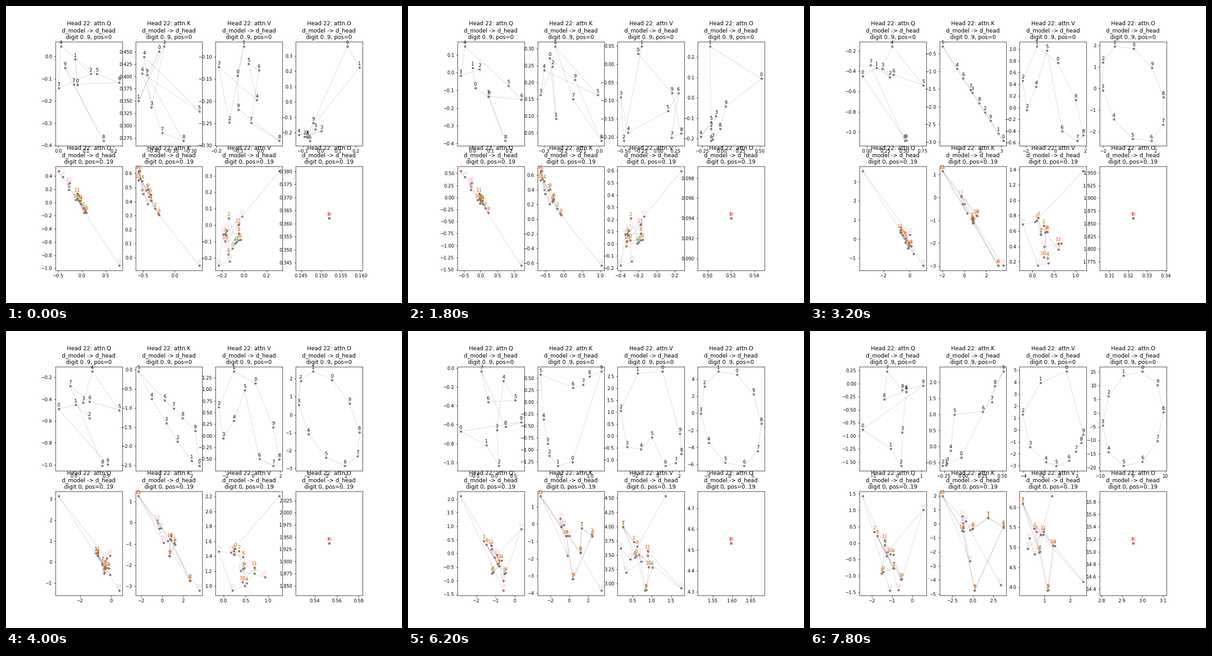
A matplotlib script that plays this animation: 864 px wide and 648 px high, repeating every 8 s.

```python
import numpy as np
import matplotlib.pyplot as plt
from matplotlib.animation import FuncAnimation

FRAMES, STEP = 40, 200
EARLY, MID, LATE = 9, 16, 39    # steps of the key poses after step 0

fig, axes = plt.subplots(2, 4, figsize=(12, 9), dpi=72)
panels = []


class Panel:
    """A labelled path moving between poses {step: (x, y)}."""

    def __init__(self, row, col, poses=None):
        self.ax = axes[row, col]
        self.closed = row == 0
        self.poses = poses
        count, what = ((19, "digit 0, pos=0..19") if row
                       else (10, "digit 0..9, pos=0"))
        self.ax.set_title(f"Head 22: attn.{'QKVO'[col]}\n"
                          f"d_model -> d_head\n{what}")
        self.line, = self.ax.plot([], [], "-o", color="gray", lw=0.3,
                                  ms=4, mew=1)
        self.labels = [
            self.ax.annotate(str(i), (0, 0), xytext=(0, 5), ha="center",
                             textcoords="offset points",
                             color=self.color(i, row))
            for i in range(count)]
        panels.append(self)

    @staticmethod
    def color(i, row):
        if row == 0:
            return "black"
        return "olive" if i < 6 else "orangered" if i < 12 else "pink"

    def points(self, step):
        steps = sorted(self.poses)
        k = min(np.searchsorted(steps, step, "right"), len(steps) - 1)
        a, b = steps[k - 1], steps[k]
        t = (step - a) / (b - a)
        return [blend(np.asarray(p), np.asarray(q), t)
                for p, q in zip(self.poses[a], self.poses[b])]

    def show(self, x, y):
        for label, x0, y0 in zip(self.labels, x, y):
            label.xy = x0, y0
        if self.closed:
            x, y = np.append(x, x[0]), np.append(y, y[0])
        self.line.set_data(x, y)
        self.ax.relim()
        self.ax.autoscale_view()


def blend(p, q, t):
    """Shape and centre move linearly, the extent grows geometrically."""
    def split(v):
        span, mid = np.ptp(v), (v.min() + v.max()) / 2
        return (v - mid) / span, mid, span
    (u, m, s), (v, n, r) = split(p), split(q)
    return m + (n - m) * t + s * (r / s) ** t * (u + (v - u) * t)


def ring(cx, rx, ax, cy, ry, ay):
    turn = np.arange(10) * 36
    return (cx + rx * np.cos(np.radians(turn + ax)),
            cy + ry * np.sin(np.radians(turn + ay)))


def chain(panel, step, x, y, spread, box=None):
    """Positions 0..18: 0 is shared with the panel above, 6..11 repeat 0..5.

    x and y hold positions 1..5 and 12..18, in box units if there is a box.
    """
    rng = np.random.default_rng(4)
    out = []
    for axis, v in enumerate((x, y)):
        v = np.array(v, float)
        if box:
            lo, hi = box[2 * axis:2 * axis + 2]
            v = lo + v * (hi - lo)
        first = np.r_[panel.poses[step][axis][0], v[:5]]
        twin = first + rng.normal(0, spread, 6) * np.ptp(v)
        twin = np.clip(twin, v.min(), v.max())
        out.append(np.r_[first, twin, v[5:]])
    return out


top_q = Panel(0, 0, {
    0: ([.069, .061, .117, .001, .01, .139, .22, .056, .163, .024],
        [-.127, -.012, -.079, -.143, .045, -.079, -.118, -.125, -.379, -.052]),
    EARLY: ([.016, .001, .039, -.065, -.041, .197, .267, .086, .18, .09],
            [-.087, .027, .019, -.018, .149, -.074, -.153, -.133, -.386,
             -.135]),
    MID: ([-.06, .13, .31, .21, .34, .76, .36, .05, .51, .53],
          [-.448, -.367, -.461, -.378, -.157, -.538, -.436, -.342, -1.087,
           -1.08]),
    LATE: ([-1.45, -.28, .16, .2, .37, .37, -.55, -.42, .21, 1.08],
           [-.88, -1.25, -1.576, -.93, -.16, -.15, -.3, .232, -.13, -.04])})

slope = np.array([3.09, 2.87, 2.22, 1.63, .9, .22, 1.2, 1.54, 1.95, 2.48])
top_k = Panel(0, 1, {
    0: ([-.385, -.441, -.371, -.406, -.426, -.276, -.431, -.377, -.319, -.418],
        [.451, .35, .461, .337, .44, .329, .406, .285, .269, .403]),
    EARLY: ([-.27, -.236, -.255, -.32, -.302, -.01, -.24, -.143, .01, -.133],
            [.272, .092, .247, .162, .236, .162, .307, .15, .026, .208]),
    MID: (slope, -.09 - .93 * slope),
    LATE: ([-.03, -.226, -.27, -.21, -.167, -.116, .253, .366, .405, .515],
           [-.34, -.59, -.605, -.535, -.13, 1, 1.09, 1.38, 1.88, 2.34])})

top_v = Panel(0, 2, {
    0: ([-.104, -.076, -.142, -.19, -.017, -.054, -.008, -.043, .085, -.101],
        [-.142, -.076, -.248, -.123, -.197, -.115, -.13, -.249, -.29, -.219]),
    EARLY: ([-.294, -.241, -.503, -.547, -.437, .138, .29, .194, .334, .198],
            [.029, .049, -.211, -.091, -.188, -.129, -.079, -.202, -.19,
             -.079]),
    MID: ([.14, -1.26, -2.22, -1.94, -1.31, -.58, .42, 1.45, 1.86, 1.35],
          [.77, 1.05, .46, -.04, .36, .98, -.4, -.57, -.47, .13]),
    LATE: ([.82, -2.1, -4.1, -3.28, -1.5, -.33, 1.08, 1.87, 2.46, 2.69],
           [4.9, 3.95, 1.3, -1.42, -2.68, -3, -2.57, -1.8, -1.07, -.38])})

top_o = Panel(0, 3, {
    0: ([.152, .22, -.091, .006, -.123, -.028, -.061, -.078, -.073, -.041],
        [.362, .225, -.225, -.192, -.214, -.178, -.254, -.225, -.232, -.136]),
    EARLY: ([.52, -.15, -.134, -.07, -.27, -.134, -.134, -.11, -.02, .057],
            [.094, .252, -.151, -.09, -.191, -.118, -.211, -.203, -.152,
             -.043]),
    MID: ring(.28, 2.44, 89, -.235, 2.26, 68),
    24: ring(.22, 4.24, 80, -.2, 3.22, 42),
    31: ring(.3, 6.8, 79, -.63, 5.65, 66),
    LATE: ring(.08, 9.3, 72, -2.1, 17.5, 80)})

# Lower row: the first two poses share one shape in different boxes.
near = np.array([.37, .41, .34, .33, .31])
x = np.r_[near, .17, .175, .16, .185, .07, 0, 1]
y = np.r_[1.02 - near, .8, .836, .865, .875, .938, 1, 0]
mid = np.array([-.42, -.67, -.35, .14, -.7])
Panel(1, 0, {
    0: chain(top_q, 0, x, y, .03, (-.49, .78, -.958, .475)),
    EARLY: chain(top_q, EARLY, x, y, .03, (-.6, 1.21, -1.417, .55)),
    MID: chain(top_q, MID,
               np.r_[mid, .32, -.32, -.25, -.28, .04, -3.62, 1.05],
               np.r_[-.25 - .85 * mid, -.77, -.17, -.07, .02, .24, 3.56,
                     -1.39], .015),
    LATE: chain(top_q, LATE,
                [-.91, -1.88, -.57, -.93, -1.35,
                 -1.27, -1.25, .55, -.68, -1.23, -2.46, -1.11],
                [-.77, .35, -1.11, -.36, -.06,
                 -.39, -.28, 1.02, -1.43, -.28, 1.43, -1.45], .03)})

near = np.array([.21, .27, .13, .06, 0])
x = np.r_[near, .15, .03, .02, .06, .075, .32, 1]
y = np.r_[.98 - 1.4 * near, .652, .918, 1, .8, .76, .55, 0]
Panel(1, 1, {
    0: chain(top_k, 0, x, y, .04, (-.57, .383, -.057, .617)),
    EARLY: chain(top_k, EARLY, x, y, .04, (-.63, 1.025, -.634, .655)),
    MID: chain(top_k, MID,
               [.71, .75, .77, 1.19, -1.97,
                .25, -.13, -.29, -.29, .04, .71, 3.55],
               [-.95, -1.04, -1.12, -.8, 1.15,
                -.69, -.29, .07, .03, -.29, -.88, -2.98], .01),
    LATE: chain(top_k, LATE,
                [1.84, 3.68, .17, -1.17, -3.69,
                 -.36, -1.2, -1.31, -1.2, -.87, -.36, 3.38],
                [.43, -.16, -4.76, -.52, 1.98,
                 -2.66, .07, .56, -.3, .2, -.43, -4.36], .01)})

x = [.12, .165, .295, .27, .325, .33, .14, .18, 0, .075, .385, 1]
y = [.32, .5, .25, .235, .27, .44, .37, .045, 0, .33, .52, 1]
Panel(1, 2, {
    0: chain(top_v, 0, x, y, .1, (-.227, .313, -.246, .329)),
    EARLY: chain(top_v, EARLY, x, y, .1, (-.4, .27, -.179, .597)),
    MID: chain(top_v, MID,
               [.2, .26, .29, .35, .6, .66, .27, .37, .13, -.22, .06, 1.17],
               [.55, .67, .58, .25, .36, .44, .4, .18, .15, .69, .72, 1.38],
               .04),
    LATE: chain(top_v, LATE,
                [.15, .6, 1.11, 1.4, .96,
                 2.51, .84, .86, .35, .41, .62, 1.29],
                [6.09, 5.47, 3.92, 5.03, 5.32,
                 4.14, 5.32, 5.31, 4.97, 5.23, 4.83, 6.28], .02)})

fixed = Panel(1, 3)   # every position lands on digit 0 of the panel above


def draw(step):
    for panel in panels:
        if panel is fixed:
            x, y = top_o.points(step)
            panel.show(np.full(19, x[0]), np.full(19, y[0]))
        else:
            panel.show(*panel.points(step))
    return []


anim = FuncAnimation(fig, draw, frames=FRAMES, interval=STEP,
                     init_func=lambda: draw(0), repeat=True)
plt.show()
```
